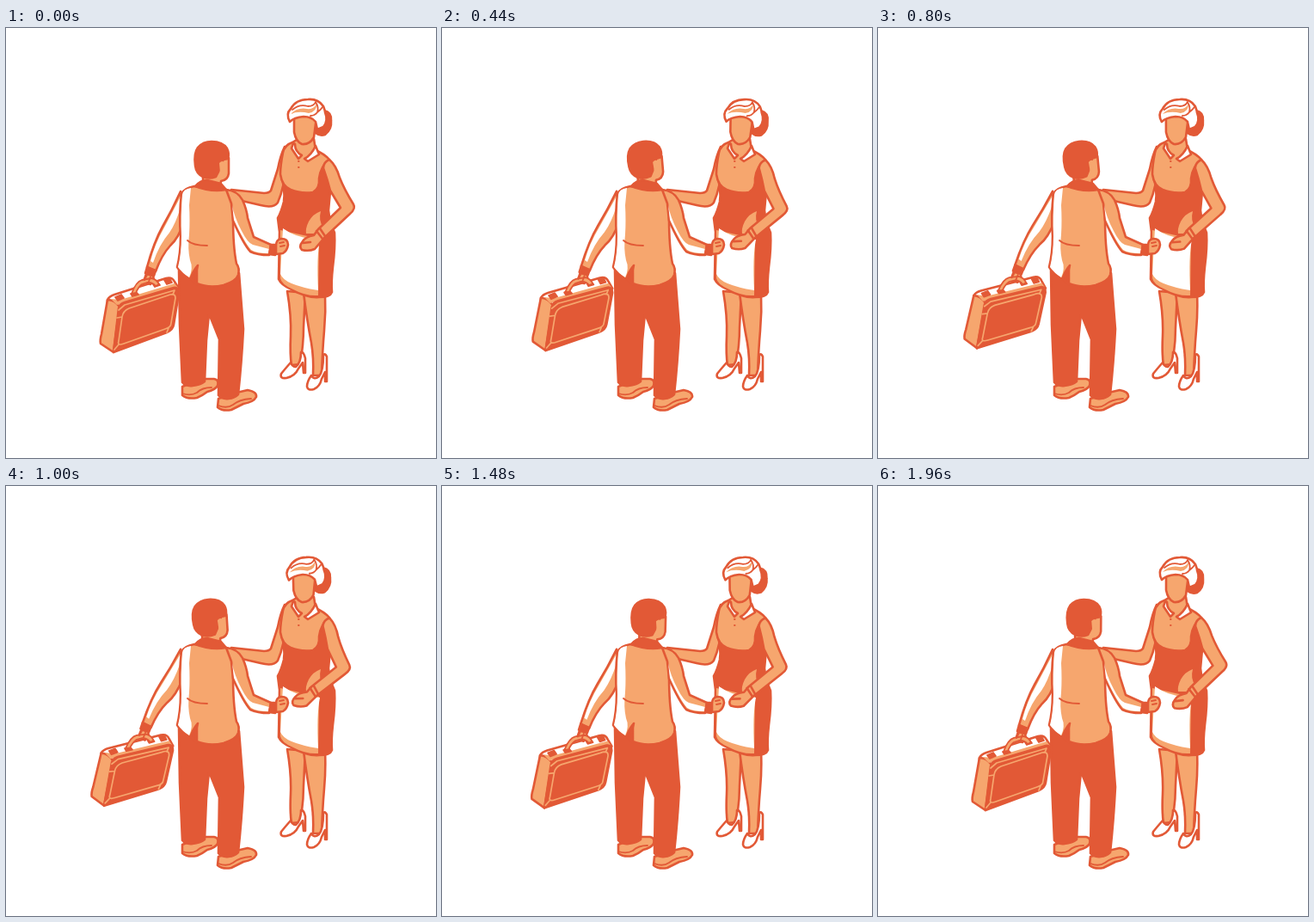
Recreate the animation shown at these times as an HTML page. Size 500 by 500 pixels, loop 2 s.

```html
<!DOCTYPE html>
<html lang="en">
<head>
<meta charset="utf-8">
<title>Greeting</title>
<style>
html, body { margin: 0; width: 100%; height: 100%; overflow: hidden; background: #fff; }
svg { display: block; width: 100vw; height: 100vh; }
path { stroke: #e25936; stroke-width: 2.6; stroke-linejoin: round; stroke-linecap: round; fill: none; }
.light { fill: #f6a66e; }
.white { fill: #fff; }
.dark { fill: #e25936; }
.flat { stroke: none; }
.thin { stroke-width: 1.8; }
.trim { stroke: #f6a66e; stroke-width: 1.7; }
</style>
</head>
<body>
<svg viewBox="0 0 500 500">
  <!-- woman: legs and shoes -->
  <path class="light" d="M327 306 Q332 335 331 358 Q330 380 332 392 L342 391 Q346 368 346 348 L348 308Z"/>
  <path class="light" d="M346 308 Q350 340 355 366 Q358 384 357 404 L367 404 Q368 375 370 352 Q372 330 371 308Z"/>
  <path class="white" d="M331 389 Q324 397 320 402 Q318 408 326 407 Q336 405 340 396 L345 389 L346 401 L348 401 L348 384 Q346 376 343 377 Q343 389 337 394 Q333 394 331 389Z"/>
  <path class="white" d="M355 404 Q350 411 350 417 Q351 422 358 420 Q365 417 367 408 L371 400 L371 411 L373 411 L373 382 Q371 378 369 380 Q369 399 364 405 Q358 410 355 404Z"/>

  <!-- woman: outstretched arm -->
  <path class="light" d="M324 138 Q319 148 316 164 L308 189 Q306 192 300 192 L262 188 L270 200 L296 206 Q311 210 316 203 Q320 194 322 184 L329 160Z"/>

  <!-- woman: body -->
  <path class="dark" d="M320 172 Q325 190 323 202 Q320 214 316 221 L318 237 L317 292 Q320 299 332 304 Q350 314 364 313 Q377 313 379 307 Q378 296 380 278 Q383 255 382 238 Q376 224 375 212 L377 190 L368 155 L330 160Z"/>
  <path class="light" d="M333 133 Q324 136 322 145 Q319 160 319 170 Q321 184 331 188 Q343 193 357 191 Q365 187 364 175 Q366 160 376 153 Q371 147 360 142 L358 129 L338 130Z"/>
  <path class="light flat" d="M319 235 L364 245 L363 311 Q349 312 334 304 Q320 298 319 291Z"/>
  <path class="white flat" d="M322 233 Q336 243 355 245 L365 246 Q361 266 363 305 Q344 302 332 297 Q322 293 319 286Z"/>
  <path class="light flat" d="M366 213 Q357 216 352 225 Q348 233 349 239 L362 239 L369 232 Q363 224 366 213Z"/>
  <path class="white" d="M334 134 L332 140 L340 152 L344 148Q336 144 336 135Z"/>
  <path class="white" d="M360 137 L364 147 L351 155 L347 152 Q355 148 360 137Z"/>
  <path class="dark thin" d="M340 155 h.6 M340 162 h.6"/>

  <g id="womanHead">
    <path class="dark" d="M370 96 Q379 98 378 108 Q379 118 371 124 Q365 126 360 122 L358 108Z"/>
    <path class="light flat" d="M341 125 L341 142 Q347 151 354 142 L359 120Z"/>
    <path class="light" d="M335 103 L335 121 Q337 132 344 135 Q353 136 358 127 L361 104 Q348 95 335 103Z"/>
    <path class="white" d="M330 109 Q325 100 331 94 Q337 83 351 83 Q363 82 369 91 Q371 96 371 98 Q375 108 369 115 L362 118 L360 109 Q355 103 346 103 Q335 104 330 109Z"/>
    <path class="light flat" d="M331 100 Q339 92 350 94 Q358 95 361 88 Q362 97 352 99 Q340 96 331 100Z"/>
    <path class="thin" d="M333 95 Q341 88 351 91 Q358 91 360 86 Q364 92 362 98 Q359 102 354 102 M362 98 Q366 95 368 92"/>
  </g>

  <g id="womanArm">
    <path class="light" d="M376 153 Q369 156 369 163 Q374 177 377 189 L389 209 L363 234 L358 241 Q348 243 345 248 Q340 254 344 258 Q352 260 359 257 Q365 250 370 244 L400 216 Q407 210 404 205 Q393 187 388 174 Q384 160 376 153Z"/>
    <path d="M361 236 L368 245 M365 233 L371 242 M345 250 L354 249"/>
  </g>

  <!-- man: swinging arm with briefcase -->
  <g id="caseArm">
    <path class="light" d="M203 190 Q193 212 182 231 Q172 249 164 278 L174 283 Q181 264 191 253 Q201 244 207 225Z"/>
    <path class="white flat" d="M203 196 L184 232 Q173 251 168 271 L171 273 Q178 252 190 238 Q198 226 203 208Z"/>
    <path class="dark" d="M164 278 L174 282 L172 288 L162 285Z"/>
    <path class="white" d="M118 316 Q120 312 126 310 L186 291 Q193 289 196 295 L201 303 L134 324 L118 322Z"/>
    <path class="light" d="M118 316 Q126 316 132 324 L125 377 L110 367 Q109 363 111 356Z"/>
    <path class="light flat" d="M122 315 L129 322 L200 302 L196 297 L133 316Z"/>
    <path class="dark" d="M131 326 Q132 321 138 319 L195 302 Q201 301 201 308 L195 345 Q194 351 187 354 L125 377Z"/>
    <path class="trim" d="M143 326 L188 311 Q197 307 197 314 L192 343 Q192 348 185 350 L137 367 Q129 370 131 364 L135 336 Q136 329 143 326Z M131 328 L138 322 L196 305 M129 337 L135 336 M126 374 L131 368 M187 354 L189 349 M196 305 L194 310"/>
    <path class="dark thin" d="M127 313 L134 310 L137 314 L130 317Z M184 293 L190 291 L193 296 L187 298Z M145 309 L151 307 L154 310 L147 312Z M171 298 L176 296 L179 299 L173 301Z"/>
    <path class="light" d="M163 286 L171 288 Q173 294 168 298 L160 295Z"/>
    <path class="light thin" d="M146 309 Q151 295 158 293 L169 291 Q175 292 178 298 L174 300 Q170 295 164 296 L158 298 Q154 301 151 308Z"/>
    <path class="thin" d="M164 287 L161 293 M168 289 L166 295"/>
  </g>

  <!-- man: shoes and trousers -->
  <path class="light" d="M205 417 L205 427 Q211 432 222 430 Q229 427 234 423 Q243 421 246 416 Q248 409 242 408 L228 408Z"/>
  <path class="light" d="M247 431 L246 441 Q252 446 262 444 L276 437 Q288 435 291 429 Q292 423 281 421 L268 424Z"/>
  <path class="thin" d="M205 425 Q215 428 222 424 Q228 418 239 418 M247 439 Q257 443 264 438 Q271 432 285 431"/>
  <path class="dark" d="M201 280 L202 345 L205 412 Q209 417 217 416 Q226 415 231 411 L233 363 L236 332 L248 362 L247 427 Q251 432 259 431 Q266 430 270 426 Q274 390 276 350 L271 285Z"/>

  <!-- man: jacket -->
  <path class="light" d="M219 184 Q207 186 204 193 Q201 217 203 242 Q203 262 199 278 Q205 287 214 292 L222 278 L222 297 Q236 303 253 299 Q268 294 270 287 Q272 279 268 274 Q264 255 264 220 L272 205 Q268 192 256 188Z"/>
  <path class="white flat" d="M215 186 Q206 187 205 194 Q203 219 204 242 Q204 262 200 278 Q205 285 213 290 Q218 279 214 270 Q211 257 213 240 Q214 225 213 206Z"/>
  <path class="dark" d="M223 276 Q216 284 215 292 L222 298 Q219 288 223 276Z"/>
  <path class="thin" d="M211 247 Q217 253 234 253"/>

  <!-- man: shaking arm -->
  <path class="light" d="M256 188 Q269 189 275 200 Q280 211 281 221 L288 243 L308 252 L306 264 Q292 264 284 260 Q276 251 264 224 L262 204Z"/>
  <path class="white flat" d="M263 206 Q265 219 274 236 Q281 250 287 252 L306 257 L305 262 Q291 262 285 258 Q277 249 265 223Z"/>
  <path class="dark" d="M308 252 L314 252 L313 264 L306 263Z"/>
  <path class="light" d="M314 253 Q314 246 320 245 Q328 245 328 252 Q327 259 322 262 L314 263Z"/>
  <path class="thin" d="M318 250 L323 249 M319 254 L324 253"/>

  <g id="manHead">
    <path class="light" d="M229 170 L229 181 L249 186 L250 178 Q258 177 259 169 L259 151 L240 148Z"/>
    <path class="dark" d="M220 160 Q218 146 223 139 Q229 132 239 132 Q252 132 257 140 Q260 146 258 152 L253 153 Q250 156 249 160 Q248 167 244 173 Q236 176 229 173 Q221 169 220 160Z"/>
    <path class="light flat" d="M248 157 Q252 153 254 157 Q255 164 249 168Z"/>
  </g>
  <path class="dark" d="M220 184 Q226 177 234 177 L250 181 L256 188 Q238 191 220 184Z"/>
</svg>
<script>
const LOOP = 2000, STEP = 40;
const armKeys = [[0, 0], [240, 4.5], [420, 4], [600, 2.2], [780, 1.5], [1000, 5.5], [1280, 6.5], [1680, 2.2], [1840, -0.3]];
const headKeys = [[0, 0], [240, 0], [600, 1.2], [1000, -1.8], [1280, -1.8], [1680, 0]];

// Smooth periodic curve through [time, value] keys.
function curve(keys, t) {
  const n = keys.length;
  const key = i => {
    const [time, value] = keys[(i + n) % n];
    return [time + LOOP * Math.floor(i / n), value];
  };
  let i = n - 1;
  while (keys[i][0] > t) i--;
  const [a, b, c, d] = [key(i - 1), key(i), key(i + 1), key(i + 2)];
  const span = c[0] - b[0], u = (t - b[0]) / span;
  const m0 = span * (c[1] - a[1]) / (c[0] - a[0]);
  const m1 = span * (d[1] - b[1]) / (d[0] - b[0]);
  const ease = u * u * (3 - 2 * u);
  return b[1] + (c[1] - b[1]) * ease + m0 * u * (1 - u) ** 2 - m1 * u * u * (1 - u);
}

function rotate(id, angle, x, y) {
  document.getElementById(id).setAttribute("transform", `rotate(${angle.toFixed(3)} ${x} ${y})`);
}

function draw(t) {
  const wave = 2 * Math.PI / LOOP;
  rotate("caseArm", 1.7 * (1 - Math.cos(wave * t)), 207, 190);
  rotate("manHead", -1.8 - 4 * Math.sin(wave * (t - 150)), 236, 190);
  rotate("womanArm", curve(armKeys, t), 370, 157);
  rotate("womanHead", curve(headKeys, t), 346, 142);
}

const start = performance.now();
function tick() {
  const t = (performance.now() - start) % LOOP;
  draw(Math.floor(t / STEP) * STEP);
  requestAnimationFrame(tick);
}
tick();
</script>
</body>
</html>
```
